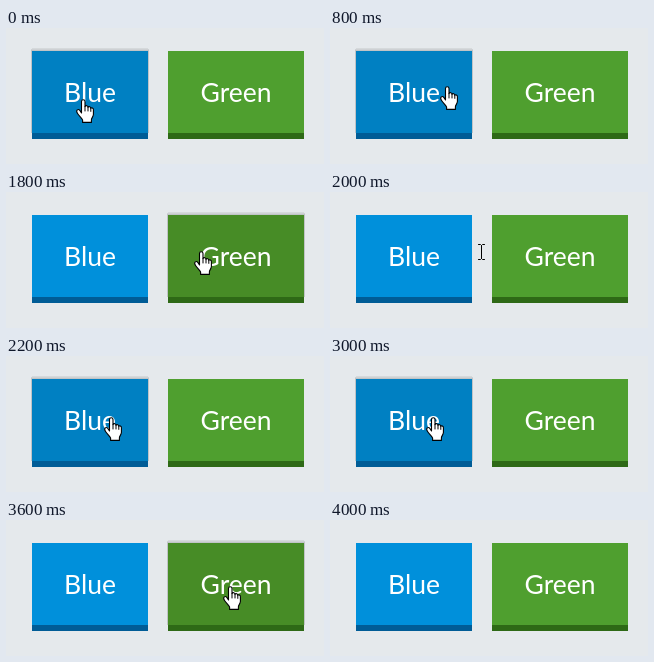
An HTML page that plays this animation: 318 by 136 pixels, repeating every 4400 ms.

```html
<!DOCTYPE html>
<html lang="en">
<head>
<meta charset="utf-8">
<title>Button hover</title>
<style>
  html, body { margin: 0; width: 100%; height: 100%; overflow: hidden; background: #e5e9ec; }
  svg { display: block; width: 100vw; height: 100vh; }
  text { font: 400 26.5px Lato, "Open Sans", sans-serif; fill: #fff; text-anchor: middle; }
  .line { fill: none; stroke: #000; stroke-linecap: round; }
</style>
</head>
<body>
<svg viewBox="0 0 318 136">
  <rect width="318" height="136" fill="#e5e9ec"/>
  <g id="buttons"></g>
  <g id="hand">
    <path d="M5.5 14V2.4C5.5 .1 9 .1 9 2.4V7.6C9.6 6.2 12 6.4 12 8.2C12.6 7.2 14.8 7.5 14.8 9.2C15.6 8.5 17.4 8.9 17.4 10.8V15.6C17.4 17.6 15.4 19 15.4 20.8V23.4H6.6V21C5.4 19 2.8 16.6 1.4 14.2C-.6 11 2.4 9.6 3.8 11.4Z"
      fill="#fff" stroke="#000" stroke-width="1.1" stroke-linejoin="round"/>
    <path class="line" d="M9 7.6V12M12 8.4V12M14.8 9.4V12.4"/>
  </g>
  <path id="beam" class="line" d="M.5 .5H2.5L3.5 1.5L4.5 .5H6.5M3.5 1.5V14.5M.5 15.5H2.5L3.5 14.5L4.5 15.5H6.5"/>
  <path id="arrow" d="M.5 1V16.3L4 13L6.6 18.3L8.8 17.3L6.4 12.2H11.3Z" fill="#fff" stroke="#000"/>
</svg>
<script>
const LOOP = 4400;

const buttons = {
  blue: { label: 'Blue', x: 26, w: 116, base: '#0090db', hover: '#0080c2', edge: '#005c96' },
  green: { label: 'Green', x: 162, w: 136, base: '#4f9f2f', hover: '#478c26', edge: '#2e6916' }
};

// start time, cursor, x, y, hovered button
const steps = [
  [0, 'hand', 70, 71, 'blue'],
  [600, 'hand', 70, 70, 'blue'],
  [800, 'hand', 110, 58, 'blue'],
  [1000, 'hand', 185, 58, 'green'],
  [1200, 'hand', 206, 58, 'green'],
  [1400, 'hand', 207, 58, 'green'],
  [1800, 'hand', 188, 59, 'green'],
  [2000, 'beam', 148, 52],
  [2200, 'hand', 98, 61, 'blue'],
  [2400, 'hand', 91, 61, 'blue'],
  [3000, 'hand', 96, 61, 'blue'],
  [3200, 'hand', 216, 60, 'green'],
  [3400, 'hand', 220, 60, 'green'],
  [3600, 'hand', 217, 66, 'green'],
  [3800, 'arrow', 124, 115],
  [4000]
];

const cursors = ['hand', 'beam', 'arrow'].map(id => document.getElementById(id));
const layer = document.getElementById('buttons');

function add(parent, tag, attrs) {
  const el = document.createElementNS('http://www.w3.org/2000/svg', tag);
  for (const key in attrs) el.setAttribute(key, attrs[key]);
  return parent.appendChild(el);
}

for (const b of Object.values(buttons)) {
  b.shadow = add(layer, 'g', { fill: '#000' });
  [.07, .1, .16].forEach((opacity, i) =>
    add(b.shadow, 'rect', { x: b.x - (i ? 1 : 0), y: 20 + i, width: b.w + (i ? 2 : 0), height: 1, opacity }));
  for (const x of [b.x - 1, b.x + b.w])
    add(b.shadow, 'rect', { x, y: 23, width: 1, height: 82, opacity: .16 });
  b.face = add(layer, 'rect', { x: b.x, y: 23, width: b.w, height: 82 });
  add(layer, 'rect', { x: b.x, y: 105, width: b.w, height: 6, fill: b.edge });
  add(layer, 'text', { x: b.x + b.w / 2, y: 74 }).textContent = b.label;
}

function draw(time) {
  const t = time % LOOP;
  const [, cursor, x, y, hovered] = steps.filter(s => s[0] <= t).pop();
  for (const [name, b] of Object.entries(buttons)) {
    const on = name === hovered;
    b.face.setAttribute('fill', on ? b.hover : b.base);
    b.shadow.setAttribute('visibility', on ? 'visible' : 'hidden');
  }
  for (const el of cursors) {
    const on = el.id === cursor;
    el.setAttribute('visibility', on ? 'visible' : 'hidden');
    if (on) el.setAttribute('transform', `translate(${x} ${y})`);
  }
}

const start = performance.now();
function tick() {
  draw(performance.now() - start);
  requestAnimationFrame(tick);
}
tick();
</script>
</body>
</html>
```
